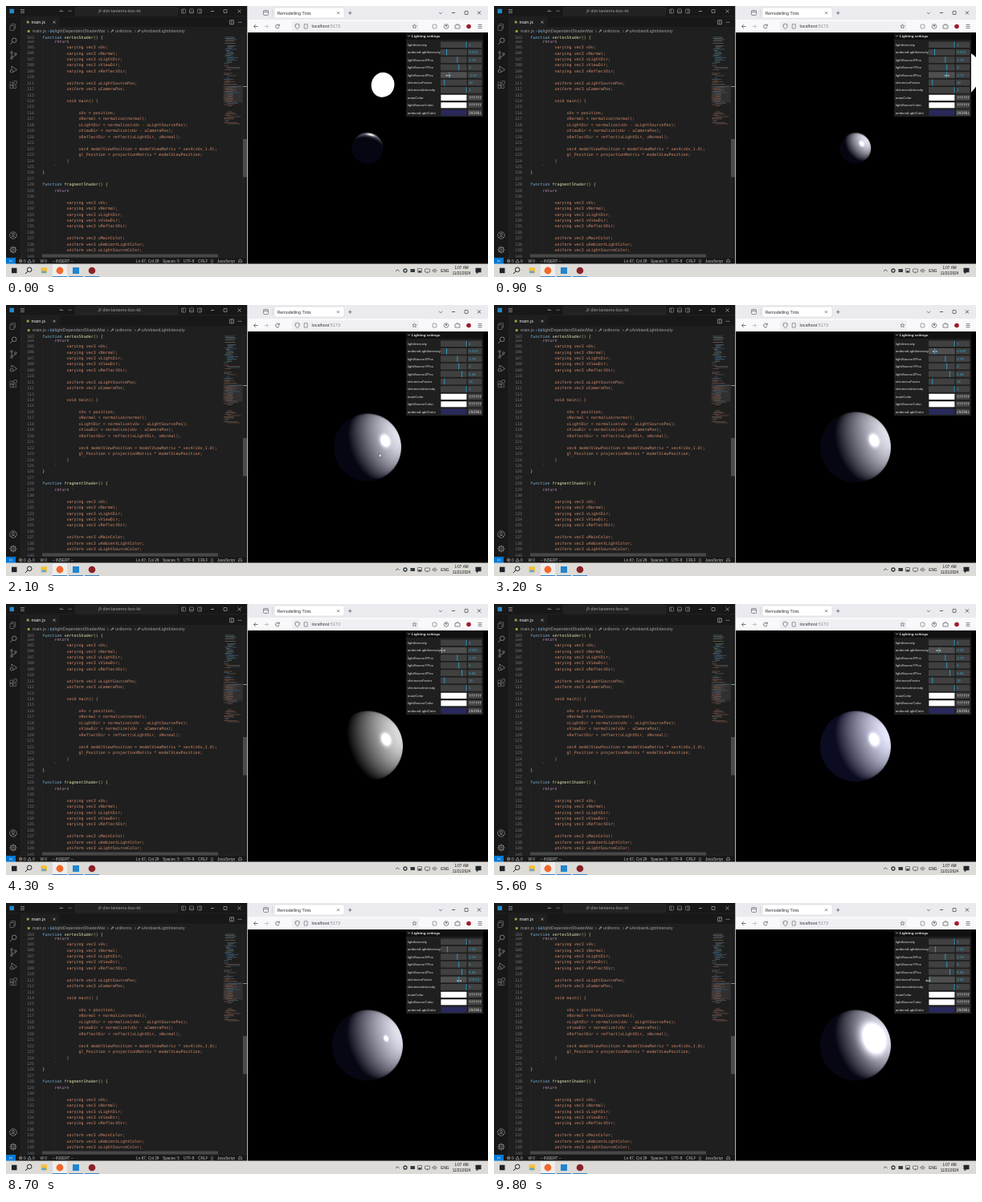
An HTML page with a canvas for the animation above (9900 ms loop, 600 by 338 pixels).

```html
<!DOCTYPE html>
<html>
<head>
<meta charset="utf-8">
<style>
html, body { margin: 0; width: 100%; height: 100%; overflow: hidden; background: #000; }
canvas { display: block; width: 100vw; height: 100vh; }
</style>
</head>
<body>
<canvas id="stage" width="600" height="338"></canvas>
<script>
const W = 600, H = 338, LOOP = 9900, STEP = 100;
const SANS = '"Liberation Sans", sans-serif';
const MONO = '"DejaVu Sans Mono", monospace';
const ACCENT = '#28aeda';
const view = document.getElementById('stage').getContext('2d');
const back = makeLayer(W, H);
let g = back;

function makeLayer(w, h) {
  const c = document.createElement('canvas');
  c.width = w;
  c.height = h;
  return c.getContext('2d');
}

// Drawing helpers, all acting on the current context g
function rect(x, y, w, h, color) {
  g.fillStyle = color;
  g.fillRect(x, y, w, h);
}
function round(x, y, w, h, r, color, line) {
  g.beginPath();
  g.roundRect(x, y, w, h, r);
  if (color) { g.fillStyle = color; g.fill(); }
  if (line) { g.strokeStyle = line; g.lineWidth = 0.6; g.stroke(); }
}
function dot(x, y, r, color) {
  g.beginPath();
  g.arc(x, y, r, 0, 7);
  g.fillStyle = color;
  g.fill();
}
function ring(x, y, r, color, width = 0.8) {
  g.beginPath();
  g.arc(x, y, r, 0, 7);
  g.strokeStyle = color;
  g.lineWidth = width;
  g.stroke();
}
function path(points, color, width = 0.8) {
  g.beginPath();
  for (let i = 0; i < points.length; i += 2) g.lineTo(points[i], points[i + 1]);
  g.strokeStyle = color;
  g.lineWidth = width;
  g.stroke();
}
function text(s, x, y, size, color, font = SANS, align = 'left', weight = '') {
  g.font = `${weight} ${size}px ${font}`;
  g.textAlign = align;
  g.textBaseline = 'alphabetic';
  g.fillStyle = color;
  g.fillText(s, x, y + size * 0.35);
}
function cross(x, y, r, color) {
  path([x - r, y - r, x + r, y + r], color, 0.7);
  path([x - r, y + r, x + r, y - r], color, 0.7);
}
function magnifier(x, y, r, color, width) {
  ring(x + r * 0.3, y - r * 0.3, r * 0.7, color, width);
  path([x - r * 0.2, y + r * 0.2, x - r, y + r], color, width);
}
function wrench(x, y, color) {
  path([x - 1.5, y + 1.5, x + 0.6, y - 0.6], color, 0.9);
  ring(x + 1, y - 1, 0.8, color, 0.6);
}
function windowButtons(xs, y, color) {
  path([xs[0] - 2, y, xs[0] + 2, y], color, 0.7);
  round(xs[1] - 2, y - 2, 4, 4, 0.3, null, color);
  cross(xs[2], y, 2, color);
}

// Code editor
const varyings = ['vUv', 'vNormal', 'vLightDir', 'vViewDir', 'vReflectDir'].map(n => `2varying vec3 ${n};`);
const code = [
  '1return `', ...varyings, '',
  '2uniform vec3 uLightSourcePos;', '2uniform vec3 uCameraPos;', '',
  '2void main() {', '',
  '3vUv = position;', '3vNormal = normalize(normal);',
  '3vLightDir = normalize(vUv - uLightSourcePos);',
  '3vViewDir = normalize(vUv - uCameraPos);',
  '3vReflectDir = reflect(vLightDir, vNormal);', '',
  '3vec4 modelViewPosition = modelViewMatrix * vec4(vUv,1.0);',
  '3gl_Position = projectionMatrix * modelViewPosition;',
  '2}', '1`', '0}', '', '0function fragmentShader() {', '1return `', '',
  ...varyings, '',
  '2uniform vec3 uMainColor;', '2uniform vec3 uAmbientLightColor;', '2uniform vec3 uLightSourceColor;', ''
];
const CELL = 3.02, ROW = 7.447;
const STRING = '#cf8a6c', BRACE = '#d8c68a';

function codeRun(parts, x, y) {
  for (const [s, color] of parts) {
    text(s, x, y, 5.02, color, MONO);
    x += s.length * CELL;
  }
}
function codeLine(line, y) {
  if (!line) return;
  const x = 45.3 + line[0] * 5 * CELL, s = line.slice(1);
  if (s.startsWith('function')) {
    codeRun([['function ', '#7db4d8'], [s.slice(9, -4), '#dcdcaa'], ['() {', BRACE]], x, y);
  } else if (s.startsWith('return')) {
    codeRun([['return ', '#b58ab3'], ['`', STRING]], x, y);
  } else {
    codeRun([[s, line[0] === '0' ? BRACE : STRING]], x, y);
  }
}
function lineNumber(n, y) {
  text(n, 35, y, 4.9, '#6e7681', MONO, 'right');
}

function minimap() {
  let seed = 7;
  const rnd = () => (seed = seed * 16807 % 2147483647) / 2147483647;
  rect(270.5, 98.5, 24, 22, '#303030');
  for (let y = 37; y < 148; y += 1.5) {
    if (rnd() < 0.16) continue;
    const shader = y > 72;
    const x = 271 + Math.floor(rnd() * 4) * 1.5;
    const color = shader ? (rnd() < 0.85 ? '#8a6353' : '#4c6f8c') : (rnd() < 0.7 ? '#4f7d9b' : '#8c8463');
    g.globalAlpha = 0.65;
    rect(x, y, 4 + rnd() * (shader ? 14 : 11), 0.8, color);
    g.globalAlpha = 1;
  }
}

function activityBar() {
  const c = '#858585';
  round(6.5, 22.5, 5, 6, 0.6, null, c);
  round(5, 24.5, 5, 6, 0.6, '#181818', c);
  magnifier(9, 44, 4, c, 0.9);
  ring(7, 58, 1.3, c);
  ring(7, 65, 1.3, c);
  ring(12, 60, 1.3, c);
  path([7, 59.5, 7, 63.5], c);
  path([12, 61.3, 10, 62.8, 7, 63], c);
  path([7, 78, 7, 75, 13.5, 79.5, 9, 82.5], c);
  ring(7, 81, 1.9, c);
  for (const [x, y] of [[5, 95], [5, 99], [9, 99]]) round(x, y, 3.6, 3.6, 0.3, null, c);
  round(9.8, 93.6, 3.6, 3.6, 0.3, null, c);
  ring(9, 286, 4.3, c);
  ring(9, 284.8, 1.5, c);
  path([6, 289, 7.5, 287.5, 10.5, 287.5, 12, 289], c);
  ring(9, 304, 3.1, c, 1);
  ring(9, 304, 1.1, c, 0.7);
  for (let i = 0; i < 8; i++) {
    const a = i * Math.PI / 4, cx = Math.cos(a), cy = Math.sin(a);
    path([9 + cx * 3.2, 304 + cy * 3.2, 9 + cx * 4.5, 304 + cy * 4.5], c, 1.1);
  }
}

function editor() {
  const dim = '#9d9d9d', light = '#c0c0c0';
  rect(0, 0, 300, 322, '#1f1f1f');
  rect(0, 0, 300, 27, '#181818');
  rect(0, 13, 18, 301, '#181818');
  rect(18, 13, 0.5, 301, '#2b2b2b');
  rect(0, 12.7, 300, 0.5, '#2b2b2b');
  rect(18, 26.6, 282, 0.5, '#2b2b2b');

  rect(4.5, 3.7, 5.5, 5.5, '#2489ca');
  for (const y of [4.5, 6.5, 8.5]) path([18, y, 23, y], light, 0.6);
  path([71.5, 6.5, 67, 6.5, 69, 4.5], dim, 0.7);
  path([77, 6.5, 81.5, 6.5, 79.5, 4.5], '#666', 0.7);
  round(86, 1.8, 128, 9.4, 2, '#222222', '#343434');
  magnifier(116.5, 6.5, 2, dim, 0.6);
  text('dim-lanterns-box-kit', 120.5, 6.5, 5.4, dim);
  for (const x of [218.5, 228.5, 238.5]) round(x, 4, 5, 5, 0.5, null, dim);
  path([220.3, 4, 220.3, 9], dim, 0.6);
  path([228.5, 7.2, 233.5, 7.2], dim, 0.6);
  path([241.7, 4, 241.7, 9], dim, 0.6);
  windowButtons([257, 273, 290.5], 6.5, light);

  rect(18.5, 13.2, 48, 14, '#1f1f1f');
  rect(25.8, 18.7, 2.8, 2.8, '#a3a33c');
  text('main.js', 31.5, 20.2, 5.5, '#f0f0f0');
  cross(60, 20.2, 1.5, light);
  round(278.5, 17.8, 5, 5, 0.4, null, light);
  path([281, 17.8, 281, 22.8], light, 0.6);
  for (let i = 0; i < 3; i++) dot(289.2 + i * 1.8, 20.3, 0.55, light);

  rect(26.8, 30.1, 2.8, 2.8, '#a3a33c');
  text('main.js', 33, 31.5, 5.3, dim);
  for (const x of [52, 126, 160]) path([x, 30, x + 1.4, 31.5, x, 33], dim, 0.5);
  path([56.6, 29.9, 55.6, 29.9, 55.6, 33.1, 56.6, 33.1], '#75beff', 0.6);
  path([58.6, 29.9, 59.6, 29.9, 59.6, 33.1, 58.6, 33.1], '#75beff', 0.6);
  dot(57.6, 31.5, 0.8, '#75beff');
  wrench(132, 31.5, light);
  wrench(165, 31.5, light);
  text('lightDependentShaderMat', 61, 31.5, 5.35, dim);
  text('uniforms', 136, 31.5, 5.3, dim);
  text('uAmbientLightIntensity', 168.5, 31.5, 5.35, dim);

  g.save();
  g.beginPath();
  g.rect(18.5, 36, 252, 278);
  g.clip();
  rect(45.5, 43, 0.4, 161, '#2e2e2e');
  rect(60.6, 43, 0.4, 156, '#2e2e2e');
  rect(45.5, 226, 0.4, 88, '#2e2e2e');
  rect(60.6, 234, 0.4, 80, '#2e2e2e');
  code.forEach((line, i) => {
    const y = 51.3 + (i - 1) * ROW;
    codeLine(line, y);
    lineNumber(104 + i, y);
  });
  rect(18.5, 36, 252, 7, '#1f1f1f');
  lineNumber(103, 39.5);
  codeLine('0function vertexShader() {', 39.5);
  g.restore();

  minimap();
  rect(45, 309.5, 219, 4.2, '#474747');
  rect(294.6, 36, 0.5, 278, '#303030');
  rect(295, 166, 5, 47.5, '#4b4b4b');
  rect(295, 100, 5, 1, '#8a8a8a');
  activityBar();

  rect(0, 314, 300, 8, '#181818');
  rect(0, 313.7, 300, 0.5, '#2b2b2b');
  rect(0, 314, 12, 8, '#0078d4');
  path([4, 316.5, 5.7, 318, 4, 319.5], '#fff', 0.6);
  path([8, 316.5, 6.5, 318, 8, 319.5], '#fff', 0.6);
  ring(18.3, 318, 1.9, light, 0.6);
  cross(18.3, 318, 0.8, light);
  text('0', 22, 318, 4.8, light);
  path([27, 319.8, 29.2, 316, 31.4, 319.8, 27, 319.8], light, 0.6);
  text('0', 33, 318, 4.8, light);
  text('W 0', 42.5, 318, 4.8, light);
  text('-- INSERT --', 57.5, 318, 4.8, light);
  text('Ln 67, Col 29', 162, 318, 4.8, light);
  text('Spaces: 5', 195, 318, 4.7, light);
  text('UTF-8', 221, 318, 4.7, light);
  text('CRLF', 239, 318, 4.7, light);
  text('{}', 255, 318, 4.7, light);
  text('JavaScript', 263, 318, 4.7, light);
  path([289, 319.3, 290, 318, 290.3, 316.3, 292.7, 316.3, 293, 318, 294, 319.3, 289, 319.3], light, 0.6);
}

// Browser window
function browser() {
  const c = '#55555d';
  rect(300, 0, 300, 17, '#eaeaef');
  rect(300, 17, 300, 16, '#f9f9fb');
  rect(300, 33, 300, 289, '#000');
  rect(300, 0, 1, 322, '#b4b4b6');

  round(320.5, 5.5, 6, 6, 1, null, c);
  path([320.5, 7.3, 326.5, 7.3], c, 0.7);
  rect(331.5, 4, 0.5, 9, '#c4c4c8');
  round(334, 2, 87, 13, 2, '#ffffff', '#d5d5da');
  text('Remodelling Tints', 337.5, 8.8, 5.3, '#33323a');
  cross(413.5, 8.7, 1.5, c);
  path([426, 8.7, 430.6, 8.7], c, 0.7);
  path([428.3, 6.4, 428.3, 11], c, 0.7);
  path([539, 7.8, 541, 9.8, 543, 7.8], c, 0.8);
  windowButtons([557, 573, 589], 8.5, '#222');

  path([313.5, 25.5, 308.5, 25.5, 310.7, 23.2], c);
  path([308.5, 25.5, 310.7, 27.8], c);
  path([321.5, 25.5, 326.5, 25.5, 324.3, 23.2], '#b5b5ba');
  path([326.5, 25.5, 324.3, 27.8], '#b5b5ba');
  g.beginPath();
  g.arc(338, 25.5, 2.4, 0.4, 5.6);
  g.strokeStyle = c;
  g.lineWidth = 0.8;
  g.stroke();
  path([340.4, 22.6, 340.4, 24.8, 338.2, 24.8], c, 0.7);
  round(356, 19, 158, 13, 2, '#f0f0f4');
  path([360, 23.2, 362.6, 22.3, 365.2, 23.2, 364.9, 26.5, 362.6, 28.7, 360.3, 26.5, 360, 23.2], c, 0.7);
  round(371.2, 22.7, 4, 5.4, 0.4, null, c);
  text('localhost', 380.5, 25.5, 5.5, '#33323a');
  const w = g.measureText('localhost').width;
  text(':5173', 380.5 + w, 25.5, 5.5, '#8a8a92');
  const star = [];
  for (let i = 0; i <= 10; i++) {
    const a = i * Math.PI / 5 - Math.PI / 2, r = i % 2 ? 1.2 : 2.8;
    star.push(508.5 + Math.cos(a) * r, 25.5 + Math.sin(a) * r);
  }
  path(star, c, 0.6);
  round(531, 23, 5, 5, 1.5, null, c);
  ring(548, 25.5, 2.8, c, 0.7);
  dot(548, 24.8, 1, c);
  path([559, 28, 559, 24, 561, 24, 561, 22.8, 563, 22.8, 563, 24, 565, 24, 565, 28, 559, 28], c, 0.7);
  dot(576, 25.5, 2.8, '#a3192d');
  for (const y of [23.5, 25.5, 27.5]) path([587.5, y, 592.5, y], c, 0.7);
}

function taskbar() {
  const c = '#33383d';
  rect(0, 321.5, 600, 16.5, '#dddbd7');
  rect(7, 326.7, 6.5, 6.5, '#20242a');
  magnifier(28, 330, 4, '#222', 1);
  round(43.5, 326.2, 7.5, 7, 0.6, '#f3c03c');
  rect(44.5, 330.5, 5.5, 2.7, '#5aa9dd');
  rect(58, 322, 18, 16, '#efeeec');
  for (const x of [58, 78, 98]) rect(x, 337, 18, 1, '#3a83c4');
  dot(67, 330, 4.4, '#f2672a');
  rect(83, 326, 8, 8, '#1f86d0');
  dot(107, 330, 4.3, '#8a2028');
  path([485, 331, 487.3, 328.7, 489.6, 331], c);
  ring(497, 330, 2, c, 1.3);
  round(503.5, 328, 5.5, 4, 0.4, c);
  round(512.5, 327.5, 5, 5, 0.5, null, c);
  rect(513.5, 330, 3, 2, c);
  round(521.5, 328, 6, 4, 0.6, null, c);
  path([524.5, 332, 524.5, 333.3], c);
  path([531, 329.2, 532.2, 329.2, 534, 327.7, 534, 332.3, 532.2, 330.8, 531, 330.8, 531, 329.2], c, 0.6);
  path([535.3, 328.6, 536.1, 330, 535.3, 331.4], c, 0.6);
  text('ENG', 541.2, 330, 4.8, '#111');
  text('1:07 AM', 567, 326.5, 4.6, '#111', SANS, 'center');
  text('11/21/2024', 567, 333.8, 4.6, '#111', SANS, 'center');
  round(584.5, 326.7, 7, 5.5, 0.5, '#22272c');
  path([586, 331, 586, 333.7, 588.5, 331.5], '#22272c', 1);
}

// Timeline: smooth runs between [time, value] keys
function key(t, keys) {
  if (t <= keys[0][0]) return keys[0][1];
  for (let i = 1; i < keys.length; i++) {
    const [a, va] = keys[i - 1], [b, vb] = keys[i];
    if (t <= b) {
      const u = (t - a) / (b - a);
      return va + (vb - va) * u * u * (3 - 2 * u);
    }
  }
  return keys[keys.length - 1][1];
}
function pose(t) {
  return {
    z: key(t, [[0, -3.6], [900, 3.73], [1200, 6.46]]),
    dist: key(t, [[1400, 9.8], [2100, 4.59], [2400, 4.39]]),
    yaw: key(t, [[1400, -0.375], [2000, -0.754]]),
    pitch: key(t, [[1400, 0.355], [2000, 0.447]]),
    ambient: key(t, [[3100, 0.214], [4100, 0.015], [4500, 0.015], [5500, 0.394], [6500, 0.24]]),
    shine: t < 7800 ? 32 : key(t, [[7800, 108], [8500, 190], [9800, 4.08]]),
    x: key(t, [[0, 550.5], [900, 563.8], [1200, 568], [1600, 465], [2400, 465], [3100, 549], [4100, 544],
      [4500, 544], [5500, 553.5], [6500, 550], [6900, 550], [7400, 555], [7800, 555], [8500, 566], [9700, 540.5]]),
    y: key(t, [[1200, 86.8], [1600, 187], [2400, 187], [3100, 58], [6900, 58], [7400, 100], [7800, 97]])
  };
}

// 3D scene, seen from an orbiting camera
const FOCAL = 188, CX = 450, CY = 177.5;
const BALL = 104;
const ball = makeLayer(BALL, BALL);
const pixels = ball.createImageData(BALL, BALL);

function lightInView({ z, yaw, pitch }) {
  const x = 2.78, y = 4;
  const near = x * Math.sin(yaw) + z * Math.cos(yaw);
  return [
    x * Math.cos(yaw) - z * Math.sin(yaw),
    y * Math.cos(pitch) - near * Math.sin(pitch),
    near * Math.cos(pitch) + y * Math.sin(pitch)
  ];
}
const dot3 = (a, b) => a[0] * b[0] + a[1] * b[1] + a[2] * b[2];
function toward(from, to) {
  const d = [to[0] - from[0], to[1] - from[1], to[2] - from[2]];
  const len = Math.hypot(...d);
  return d.map(v => v / len);
}

function shadeBall(p, light) {
  const D = p.dist, eye = [0, 0, D], edge = FOCAL / Math.sqrt(D * D - 1);
  const data = pixels.data;
  for (let j = 0, k = 0; j < BALL; j++) {
    for (let i = 0; i < BALL; i++, k += 4) {
      const px = i + 0.5 - BALL / 2, py = BALL / 2 - j - 0.5;
      const cover = Math.min(1, Math.max(0, edge - Math.hypot(px, py) + 0.5));
      data[k + 3] = cover * 255;
      if (!cover) continue;
      const len = Math.hypot(px, py, FOCAL);
      const ray = [px / len, py / len, -FOCAL / len];
      const b = -D * ray[2];
      const s = b - Math.sqrt(Math.max(0, b * b - D * D + 1));
      const n = [ray[0] * s, ray[1] * s, D + ray[2] * s];
      const l = toward(n, light), v = toward(n, eye);
      const nl = dot3(n, l);
      const mirror = 2 * nl * dot3(n, v) - dot3(l, v);
      const spec = nl > 0 && mirror > 0 ? Math.pow(mirror, p.shine) : 0;
      const lit = 255 * (0.86 * Math.max(0, nl) + spec);
      data[k] = data[k + 1] = lit + 28 * p.ambient;
      data[k + 2] = lit + 84 * p.ambient;
    }
  }
  ball.putImageData(pixels, 0, 0);
}

function scene(p) {
  const light = lightInView(p);
  g.save();
  g.beginPath();
  g.rect(301, 33, 299, 288.5);
  g.clip();
  shadeBall(p, light);
  g.drawImage(ball.canvas, CX - BALL / 2, CY - BALL / 2);
  const depth = p.dist - light[2];
  if (depth > 1.2 && p.dist > 9) {
    const k = FOCAL / depth, x = light[0] * k, y = -light[1] * k;
    const r = 0.95 * k, stretch = Math.hypot(x, y, FOCAL) / FOCAL;
    g.beginPath();
    g.ellipse(CX + x, CY + y, r * stretch, r, Math.atan2(y, x), 0, 7);
    g.fillStyle = '#fff';
    g.fill();
  }
  g.restore();
}

// Settings panel
const trim = (v, n) => String(+v.toFixed(n));

function panel(p) {
  const rows = [
    ['lightIntensity', 1, '1'],
    ['ambientLightIntensity', p.ambient, trim(p.ambient, 3)],
    ['lightSourceXPos', 0.639, '2.78'],
    ['lightSourceYPos', 0.7, '4'],
    ['lightSourceZPos', (p.z + 10) / 20, p.z.toFixed(2)],
    ['shininessFactor', p.shine / 256, trim(p.shine, 2)],
    ['shininessIntensity', 1, '1'],
    ['mainColor', '#ffffff'],
    ['lightSourceColor', '#ffffff'],
    ['ambientLightColor', '#29295c']
  ];
  rect(498, 33, 96, 105.2, '#1f1f1f');
  rect(498, 33, 96, 9, '#111111');
  path([500.3, 36.7, 501.6, 38.1, 502.9, 36.7], '#ebebeb', 0.7);
  text('Lighting settings', 505, 37.4, 4.4, '#ebebeb', SANS, 'left', 'bold');
  rows.forEach(([name, value, label], i) => {
    const y = 48.3 + i * 9.43, top = y - 3.8;
    text(name, 499.8, y, 4.35, '#e0e0e0');
    if (label === undefined) {
      round(541.4, top + 0.2, 32, 7.2, 0.6, value);
      round(575, top, 17.3, 7.6, 0.8, '#404040');
      text(value.slice(1), 576, y, 4.5, '#e0e0e0', MONO);
    } else {
      const hover = p.x > 539 && Math.abs(p.y - y) < 3.9;
      round(541, top, 32.7, 7.6, 0.8, hover ? '#4f4f4f' : '#404040');
      rect(541.4 + Math.min(1, value) * 31.4, top, 0.8, 7.6, ACCENT);
      round(575, top, 17.3, 7.6, 0.8, '#404040');
      text(label, 576.2, y, 4.3, ACCENT);
    }
  });
}

function pointer({ x, y }) {
  if (y > 110 || x < 535) {
    g.beginPath();
    for (const [dx, dy] of [[0, 0], [0, 5], [1.2, 4], [2, 5.6], [2.8, 5.2], [2.1, 3.7], [3.6, 3.6]]) {
      g.lineTo(x - 0.5 + dx, y - 2 + dy);
    }
    g.closePath();
    g.fillStyle = '#fff';
    g.fill();
    g.strokeStyle = '#222';
    g.lineWidth = 0.4;
    g.stroke();
    return;
  }
  for (const [color, width] of [['#222', 1.2], ['#fff', 0.7]]) {
    path([x - 2.6, y, x + 2.6, y], color, width);
    for (const s of [-1, 1]) path([x + s * 1.7, y - 1.1, x + s * 2.8, y, x + s * 1.7, y + 1.1], color, width);
  }
}

editor();
browser();
taskbar();
g = view;

const start = performance.now();
function frame(now) {
  const t = Math.floor((Math.max(0, now - start) % LOOP) / STEP) * STEP;
  const p = pose(t);
  g.drawImage(back.canvas, 0, 0);
  scene(p);
  panel(p);
  pointer(p);
  requestAnimationFrame(frame);
}
frame(start);
</script>
</body>
</html>
```
